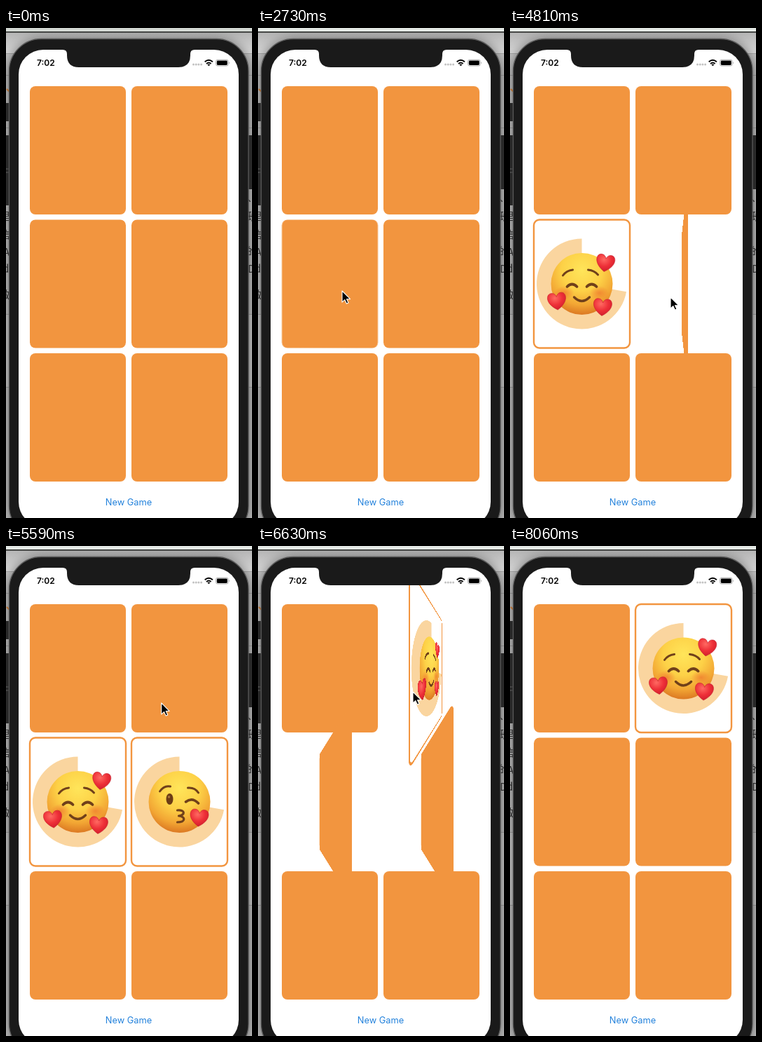
Write an HTML page that moves like this. It is 351x699 px and loops after 8190 ms.

```html
<!DOCTYPE html>
<html lang="en">
<head>
<meta charset="utf-8">
<title>Card flip game</title>
<style>
html, body { margin: 0; width: 100%; height: 100%; overflow: hidden; }
#stage { position: relative; width: 351px; height: 699px; overflow: hidden; background: #c4c4c4; }
#stage > svg { position: absolute; left: 0; top: 0; }
#stage > .card { overflow: visible; transform-origin: 50% 50%; }
text { font-family: Inter, "Noto Sans", sans-serif; }
.side text { font: 15px "Noto Sans CJK SC", "Noto Sans CJK", sans-serif; fill: #333; }
</style>
</head>
<body>
<div id="stage">
  <svg width="351" height="699">
    <defs>
      <linearGradient id="bar" x2="0" y2="1"><stop stop-color="#b4b4b4"/><stop offset="1" stop-color="#dadada"/></linearGradient>
      <radialGradient id="skin" cx=".5" cy=".28" r=".74">
        <stop stop-color="#ffe55a"/><stop offset=".45" stop-color="#fdd147"/>
        <stop offset=".76" stop-color="#f2a634"/><stop offset="1" stop-color="#d97320"/>
      </radialGradient>
      <radialGradient id="blush"><stop stop-color="#ee6a2a" stop-opacity=".6"/><stop offset="1" stop-color="#ee6a2a" stop-opacity="0"/></radialGradient>
      <radialGradient id="red" cx=".4" cy=".3" r=".8">
        <stop stop-color="#ff6a62"/><stop offset=".5" stop-color="#ee3038"/><stop offset="1" stop-color="#c9182a"/>
      </radialGradient>
      <filter id="blur" x="-20%" y="-20%" width="140%" height="140%"><feGaussianBlur stdDeviation="9"/></filter>
      <path id="heart" fill="url(#red)" stroke="#c51f2c" stroke-width=".6" transform="scale(.93)" d="M0 13C-20 1-15-14-7-13-3-13-1-10 0-7 1-10 3-13 7-13 15-14 20 1 0 13Z"/>
      <g id="love">
        <circle r="44" fill="url(#skin)"/>
        <ellipse cx="-25" cy="13" rx="14" ry="10" fill="url(#blush)"/>
        <ellipse cx="25" cy="13" rx="14" ry="10" fill="url(#blush)"/>
        <g fill="none" stroke="#70401a" stroke-linecap="round">
          <path stroke-width="3" d="M-27-12Q-22-19-13-20M9-20Q18-19 23-13"/>
          <path stroke-width="3.8" d="M-21 4Q-14-3-7 4M7 4Q14-3 21 4"/>
          <path stroke-width="3.4" d="M-11 19Q0 30 11 19"/>
        </g>
        <use href="#heart" transform="translate(33.5 -29.5) rotate(9)"/>
        <use href="#heart" transform="translate(-35.5 25) rotate(-6)"/>
        <use href="#heart" transform="translate(29.5 33.5) rotate(5)"/>
      </g>
      <g id="kiss">
        <circle r="44" fill="url(#skin)"/>
        <ellipse cx="-14" cy="-4" rx="5" ry="8" fill="#6b3c16"/>
        <circle cx="-15" cy="-7" r="1.7" fill="#a8753c"/>
        <g fill="none" stroke="#70401a" stroke-linecap="round" stroke-linejoin="round">
          <path stroke-width="3" d="M-28-15Q-22-24-13-22M12-20Q22-21 27-13"/>
          <path stroke-width="3.6" d="M9 0Q18-7 27 2"/>
          <path stroke-width="3.2" d="M-3 12C9 11 8 19-1 20 9 21 9 29-3 29"/>
        </g>
        <use href="#heart" transform="translate(28 23) rotate(6)"/>
      </g>
    </defs>

    <rect y="6" width="351" height="30" fill="url(#bar)"/>
    <path d="M0 408H351V512H0Z" fill="#cecece"/>
    <path d="M0 36.5H351M0 67.5H351M0 142.5H351M0 408.5H351M0 512.5H351" stroke="#a5a5a5"/>
    <path d="M0 107H8V133H0ZM0 153H8V253H0ZM344 153H351V230H344Z" fill="#343434"/>
    <path d="M0 201h5M0 206h4" stroke="#aaa" stroke-dasharray="1 1"/>
    <path d="M1 87l4 4" stroke="#e58a3a" stroke-width="2"/>
    <g class="side">
      <text x="-9" y="274">里</text><text x="-9" y="300">信</text><text x="-4" y="325">A</text>
      <text x="-5" y="349">d</text><text x="-9" y="386">放</text>
      <text x="344" y="247">、</text><text x="345" y="274">班</text><text x="343" y="324">的</text><text x="345" y="349">D</text>
    </g>
    <rect x="4" y="17" width="343" height="712" rx="47" opacity=".5" filter="url(#blur)"/>
    <rect id="strip" width="351" height="5"/>
    <path d="M0 5.7H351" stroke="#202220" stroke-width="1.5"/>
    <rect x="4.5" y="15.5" width="341.5" height="712" rx="46" fill="#1a1a1a" stroke="#5b5b5b" stroke-width="1.3"/>
    <rect x="18" y="31" width="314" height="680" rx="35" fill="#fff"/>
    <text x="175" y="681" font-size="12.8" text-anchor="middle" fill="#2583dc">New Game</text>
  </svg>

  <svg id="top" width="351" height="699">
    <path d="M81 30H269V31Q263 31 263 37V39Q263 56 246 56H104Q87 56 87 39V37Q87 31 81 31Z" fill="#1a1a1a"/>
    <text x="44" y="54" font-size="12" font-weight="600">7:02</text>
    <g fill="#c2c2c2"><circle cx="267.5" cy="52" r="1.5"/><circle cx="271.2" cy="52" r="1.5"/><circle cx="274.9" cy="52" r="1.5"/><circle cx="278.6" cy="52" r="1.5"/></g>
    <path d="M283.7 48.3Q289.3 43 294.9 48.3M286 51Q289.3 48 292.6 51" fill="none" stroke="#000" stroke-width="1.9"/>
    <path d="M289.3 54.3l-2-2.1q2-1.5 4 0z"/>
    <rect x="299.5" y="45.3" width="17.6" height="8.8" rx="2.5" fill="none" stroke="#999" stroke-width=".8"/>
    <rect x="300.8" y="46.5" width="15" height="6.4" rx="1.4"/>
    <path d="M318 48q1.6 1.7 0 3.4z" fill="#999"/>
    <path id="cursor" d="M0 0V16.2L3.8 12.7 6.4 18.3 9 17.1 6.5 11.7H11.5Z" fill="#000" stroke="#fff" stroke-width="1.1" stroke-linejoin="round"/>
  </svg>
</div>
<script>
const LOOP = 8190, STEP = 130, FLIP = 1320, ORANGE = '#f2953f';
const $ = id => document.getElementById(id);

// Per card: [start time, final angle]; every card begins face down at 180 degrees.
const flips = [[], [[5896, 0]], [[2704, 0], [5896, 180]], [[4164, 0], [5896, 180]], [], []];
const faces = ['', 'love', 'love', 'kiss', '', ''];

// Pointer tip: time, x, y
const path = [
  [0, 150, 712], [1000, 150, 712], [1820, 128, 379], [2210, 120, 375],
  [2860, 120, 375], [3400, 229, 384], [5100, 229, 384], [5720, 221, 208],
  [7150, 221, 208], [7930, 328, 686], [8060, 345, 722], [LOOP, 345, 722]
];

const cards = flips.map((_, i) => {
  const rect = attrs => `<rect x="-68.5" y="-91.5" width="137" height="183" rx="8" ${attrs}/>`;
  const a = Math.PI / 18, r = 64.5;
  const front = `<g>${rect(`fill="#fff" stroke="${ORANGE}" stroke-width="2.4"`)}
    <path d="M0 0L${r * Math.cos(a)} ${r * Math.sin(a)}A${r} ${r} 0 1 1 0 ${-r}Z" fill="#fad59f"/>
    <use href="#${faces[i]}"/></g>`;
  $('top').insertAdjacentHTML('beforebegin',
    `<svg class="card" width="152" height="200" viewBox="-76 -100 152 200">
    ${front}${rect(`fill="${ORANGE}"`)}</svg>`);
  return $('top').previousElementSibling;
});

// Ease-in-out, cubic-bezier(.42, 0, .58, 1)
function ease(x) {
  if (x <= 0 || x >= 1) return x <= 0 ? 0 : 1;
  let lo = 0, hi = 1, s;
  for (let i = 0; i < 24; i++) {
    s = (lo + hi) / 2;
    const bx = 1.26 * s * (1 - s) ** 2 + 1.74 * s * s * (1 - s) + s ** 3;
    if (bx < x) lo = s; else hi = s;
  }
  return s * s * (3 - 2 * s);
}

function pointer(t) {
  const i = path.findIndex(p => p[0] > t);
  const [t0, x0, y0] = path[i - 1], [t1, x1, y1] = path[i];
  const k = ease((t - t0) / (t1 - t0));
  return [x0 + (x1 - x0) * k, y0 + (y1 - y0) * k];
}

function draw(t) {
  cards.forEach((card, i) => {
    let angle = 180;
    for (const [start, end] of flips[i]) angle += (end - angle) * ease((t - start) / FLIP);
    const [front, back] = card.children;
    front.style.display = angle < 90 ? '' : 'none';
    back.style.display = angle < 90 ? 'none' : '';
    // Placed by transform, so half pixels are kept.
    const place = `translate(${26.5 + 145 * (i % 2)}px, ${74.5 + 190.5 * (i >> 1)}px)`;
    card.style.transform = place + (angle % 180 ? ` perspective(183px) rotateY(${angle}deg)` : '');
  });
  $('cursor').setAttribute('transform', `translate(${pointer(t)})`);
  $('strip').setAttribute('fill', t < 2600 ? '#d3d8d3' : '#e4e9e5');
}

const begin = performance.now();
function tick() {
  const t = (performance.now() - begin) % LOOP;
  draw(Math.floor(t / STEP) * STEP);
  requestAnimationFrame(tick);
}
tick();
</script>
</body>
</html>
```
